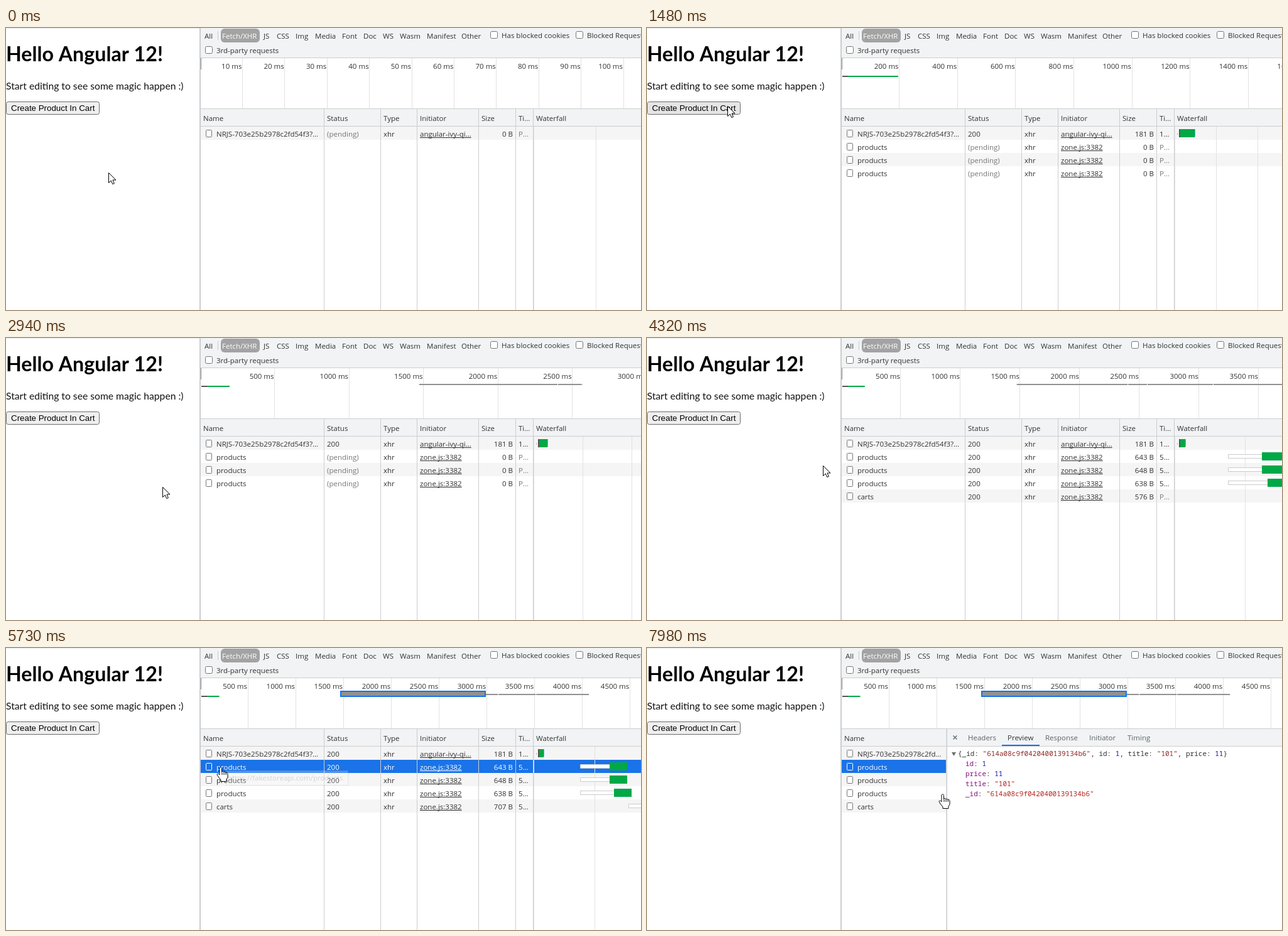
An HTML page with a canvas for the animation above (8 s loop, 1011 by 449 pixels).

```html
<!DOCTYPE html>
<html lang="en">
<head>
<meta charset="utf-8">
<title>Network panel demo</title>
<style>
html, body { margin: 0; width: 100%; height: 100%; overflow: hidden; background: #fff; }
canvas { display: block; }
</style>
</head>
<body>
<canvas id="stage" width="1011" height="449"></canvas>
<script>
const LOOP = 8000, W = 1011, H = 449;
const ctx = document.getElementById('stage').getContext('2d');

const UI = '11.5px "Open Sans", "Noto Sans", sans-serif';
const MONO = '11px "Noto Sans Mono", "DejaVu Sans Mono", monospace';
const INK = '#333', DIM = '#777', LINE = '#cacdd1', GRID = '#e2e2e2';
const BAR = '#f1f3f4', BLUE = '#1a73e8', GREEN = '#00a846';

// time, pointer x, pointer y
const POINTER = [
  [0, 163, 230], [130, 163, 230], [760, 128, 124], [1960, 128, 124],
  [2750, 222, 215], [2940, 249, 237], [3040, 249, 237], [3390, 260, 225],
  [3870, 260, 225], [4110, 280, 203], [4320, 280, 203], [5040, 345, 212],
  [5140, 345, 212], [5390, 342, 190], [6190, 342, 190], [6650, 606, 258],
  [6950, 569, 250], [7050, 569, 250], [7250, 513, 236], [7550, 709, 188],
  [7850, 664, 209], [7980, 471, 233], [8000, 471, 233]
];

// time, overview span in ms, waterfall ms per pixel, end of the grey overview bar
const SCALE = [
  [0, 104, .5025, 0], [130, 104, .5025, 0], [400, 240, 1.1, 0], [1310, 240, 1.1, 0],
  [1420, 1514, 7.52, 0], [1960, 1514, 7.52, 1467], [2750, 2957, 12.82, 2565],
  [3040, 2957, 12.82, 2565], [3390, 3690, 15, 2879], [3659, 3690, 15, 2879],
  [3660, 3690, 17.7, 4065], [4340, 3690, 17.7, 4065], [4400, 4610, 20.5, 4065],
  [8000, 4610, 20.5, 4065]
];

const ARROW = new Path2D('M.5 .5V16.5L4.3 13 6.8 18.6 9.4 17.5 7 12H12Z');
const HAND = new Path2D('M-2 12V1.5C-2-.6 1.5-.6 1.5 1.5V7.5C2 6 4 6 4.5 7.5' +
  'C5 6.6 7.5 7 7.7 8.5C8.5 7.8 11 8.3 11 10.5V16L9 19V22.5H0V20L-4 15-6 11.5C-5.7 9.5-4 9.5-2 12Z');

function sample(table, t, ease = x => x) {
  const i = Math.max(1, table.findIndex(row => row[0] > t));
  const a = table[i - 1], b = table[i];
  const u = ease((t - a[0]) / (b[0] - a[0]));
  return a.slice(1).map((v, j) => v + (b[j + 1] - v) * u);
}

const smooth = x => x * x * (3 - 2 * x);

// smallest 1-2-5 step that is at least 64 pixels wide
function gridStep(pxPerMs) {
  for (let p = 1; ; p *= 10)
    for (const m of [1, 2, 5]) if (m * p * pxPerMs >= 64) return m * p;
}

function rect(x, y, w, h, color) {
  ctx.fillStyle = color;
  ctx.fillRect(x, y, w, h);
}

function box(x, y, w, h, r, fill, stroke) {
  ctx.beginPath();
  ctx.roundRect(x, y, w, h, r);
  ctx.fillStyle = fill;
  ctx.fill();
  if (!stroke) return;
  ctx.lineWidth = 1;
  ctx.strokeStyle = stroke;
  ctx.stroke();
}

function text(s, x, y, color = INK, font = UI, align = 'left') {
  ctx.font = font;
  ctx.textAlign = align;
  ctx.fillStyle = color;
  ctx.fillText(s, x, y);
}

const vline = (x, y, h, color = LINE) => rect(Math.floor(x), y, 1, h, color);

function drawPage(t, x, y) {
  rect(0, 0, W, H, '#fff');
  rect(0, 0, 309, 1, '#ececec');
  text('Hello Angular 12!', 0, 53, '#000', 'bold 32.2px Lato, sans-serif');
  text('Start editing to see some magic happen :)', 0, 98, '#111', '15.7px Lato, sans-serif');
  const hover = x < 149 && y > 117 && y < 138;
  const pressed = t > 1310 && t < 1400;
  box(.5, 117.5, 148, 20, 3, pressed ? '#f5f5f5' : hover ? '#e5e5e5' : '#efefef', '#6b6b6b');
  text('Create Product In Cart', 8, 132, '#000', '13.333px "Liberation Sans", Arial, sans-serif');
}

function drawFilters() {
  rect(309, 0, W - 309, 47, BAR);
  rect(309, 47, W - 309, 1, LINE);
  box(342, 1, 62, 22, 6, '#a3a3a3');
  text('Fetch/XHR', 344, 17, '#fff');
  vline(337, 5, 14);
  const kinds = { All: 316, JS: 410, CSS: 431, Img: 461, Media: 492, Font: 535, Doc: 569,
    WS: 600, Wasm: 627, Manifest: 670, Other: 725 };
  for (const k in kinds) text(k, kinds[k], 17);
  const checks = [['Has blocked cookies', 771, 6], ['Blocked Requests', 907, 6], ['3rd-party requests', 317, 30]];
  for (const [label, x, y] of checks) {
    box(x + .5, y - .5, 11, 11, 2, '#fff', '#767676');
    text(label, x + 18, y + 10);
  }
}

function drawOverview(t, span, end) {
  const s = 701 / span, step = gridStep(s);
  const at = ms => 310 + ms * s;
  for (let ms = step; at(ms) < W + 60; ms += step) {
    vline(at(ms) - 1, 48, 80, GRID);
    text(ms + ' ms', at(ms) - 2, 65, INK, UI, 'right');
  }
  rect(309, 48, 2, 18, '#8a8a8a');
  if (t >= 300) {
    rect(311, 76, 10, 2, '#555');
    rect(320, 76, at(194) - 320, 2, GREEN);
  }
  if (end > 1467) {
    const top = 73;
    rect(at(1467), top, at(end) - at(1467), 2, '#919191');
    const gaps = t < 4340 ? [2396, 2558, 3111] : [3112, 3507];
    for (const ms of gaps) if (ms < end) rect(at(ms), top, 1, 2, '#fff');
  }
  if (t >= 5630) {
    rect(532, 68, 232, 10, BLUE);
    rect(534, 70, 228, 6, '#919191');
  }
  rect(309, 128, W - 309, 1, LINE);
}

function requests(t) {
  const done = t >= 3200, first = t >= 300;
  const list = [{
    name: 'NRJS-703e25b2978c2fd54f3?…', from: 'angular-ivy-qi…',
    ok: first, size: first ? '181 B' : '0 B', time: first ? '1…' : 'P…'
  }];
  if (t >= 1400)
    for (const size of [643, 648, 638])
      list.push({ name: 'products', from: 'zone.js:3382', ok: done,
        size: done ? size + ' B' : '0 B', time: done ? '5…' : 'P…' });
  if (t >= 3300)
    list.push({ name: 'carts', from: 'zone.js:3382', ok: t >= 4320,
      size: t < 4320 ? '0 B' : t < 4340 ? '576 B' : '707 B', time: t < 4340 ? 'P…' : '5…' });
  return list;
}

function drawWaterfall(t, i, y, msPerPx) {
  const at = ms => Math.floor(843 + ms / msPerPx);
  if (i === 0 && t >= 300) {
    const end = Math.floor(847 + 194 / msPerPx);
    rect(844, y + 10, 1, 3, '#bbb');
    rect(847, y + 4, end - 847, 13, GREEN);
    rect(847, y + 4, 2, 13, '#555');
    rect(end, y + 4, 1, 12, '#4db6e8');
  }
  if (i === 0 || t < 3390) return;
  const [start, wait, stop] = i === 4 ? [3053, 4000, 4065] : i === 3 ? [1467, 2580, 3155] : [1467, 2420, 3012];
  if (at(start) >= W) return;
  box(at(start) + .5, y + 7.5, at(wait) - at(start), 6, 0, '#fff', '#ccc');
  rect(at(wait), y + 4, at(stop) - at(wait), 13, GREEN);
}

function drawTable(t, pointer, msPerPx, detail) {
  const right = detail ? 477 : W;
  rect(310, 129, W - 310, 27, BAR);
  rect(310, 156, W - 310, 1, LINE);
  const list = requests(t);
  const over = pointer[0] > 310 && t < 5630 ? Math.floor((pointer[1] - 157) / 21) : -1;
  const rowY = i => 157 + i * 21;
  const picked = i => i === 1 && t >= 5630;

  list.forEach((r, i) => {
    const fill = picked(i) ? BLUE : i === over ? '#ebf2fc' : i % 2 ? '#fff' : '#f5f5f5';
    rect(310, rowY(i), right - 310, 21, fill);
  });

  if (!detail) {
    const heads = { Status: 511, Type: 601, Initiator: 659, Size: 757, 'Ti…': 816, Waterfall: 844 };
    for (const h in heads) text(h, heads[h], 148);
    const step = gridStep(1 / msPerPx) / msPerPx;
    for (let x = 840 + step; x < W; x += step) vline(x, 157, H - 157, GRID);
    for (const x of [506, 596, 654, 752, 811, 839]) vline(x, 129, H - 129);
    vline(840, 157, H - 157, GRID);
  }
  text('Name', 314, 148);

  list.forEach((r, i) => {
    const y = rowY(i), base = y + 16, ink = picked(i) ? '#fff' : INK;
    const faint = r.ok ? ink : DIM;
    box(318.5, y + 5.5, 9, 11, 1, picked(i) ? BLUE : '#fff', picked(i) ? '#fff' : '#777');
    text(detail && i === 0 ? 'NRJS-703e25b2978c2fd…' : r.name, 335, base, ink);
    if (detail) return;
    text(r.ok ? '200' : '(pending)', 511, base, faint);
    text('xhr', 601, base, ink);
    text(r.from, 659, base, ink);
    rect(659, base + 1, ctx.measureText(r.from).width, 1, ink);
    text(r.size, 807, base, ink, UI, 'right');
    text(r.time, 816, base, r.time === 'P…' ? DIM : ink);
    drawWaterfall(t, i, y, msPerPx);
  });
}

function code(x, y, parts) {
  for (const [s, color] of parts) {
    text(s, x, y, color, MONO);
    x += ctx.measureText(s).width;
  }
}

function drawDetail() {
  const id = '"614a08c9f0420400139134b6"';
  const key = '#881280', str = '#b3261e', num = '#1a1aa6', ink = '#333';
  vline(477, 129, H - 129);
  vline(476, 129, H - 129, '#dcdfe2');
  ctx.beginPath();
  ctx.moveTo(487.5, 139.5); ctx.lineTo(493.5, 145.5);
  ctx.moveTo(493.5, 139.5); ctx.lineTo(487.5, 145.5);
  ctx.lineWidth = 1.2;
  ctx.strokeStyle = '#5f6368';
  ctx.stroke();
  const tabs = { Headers: 511, Preview: 574, Response: 634, Initiator: 704, Timing: 765 };
  for (const k in tabs) text(k, tabs[k], 147, k === 'Preview' ? INK : '#5f6368');
  rect(565, 154, 60, 2, BLUE);

  ctx.beginPath();
  ctx.moveTo(485, 166); ctx.lineTo(492, 166); ctx.lineTo(488.5, 172);
  ctx.fillStyle = '#6e6e6e';
  ctx.fill();
  code(495, 172, [['{_id: ', ink], [id, '#8e2a26'], [', id: ', ink], ['1', num],
    [', title: ', ink], ['"101"', '#8e2a26'], [', price: ', ink], ['11', num], ['}', ink]]);
  const props = [['id', '1', num], ['price', '11', num], ['title', '"101"', str], ['_id', id, str]];
  props.forEach(([k, v, color], i) => code(507, 188 + i * 16, [[k, key], [': ', ink], [v, color]]));
}

function drawTooltip() {
  ctx.globalAlpha = .22;
  box(350.5, 195.5, 194, 23, 0, '#fff', '#aaa');
  text('https://fakestoreapi.com/products', 353, 211, '#555');
  ctx.globalAlpha = 1;
}

function drawPointer([x, y], detail) {
  const overRow = x > 310 && x < (detail ? 477 : W) && y > 157 && y < 262;
  const shape = overRow ? HAND : ARROW;
  ctx.save();
  ctx.translate(x, y);
  ctx.lineWidth = 1;
  ctx.lineJoin = 'round';
  ctx.fillStyle = '#fff';
  ctx.fill(shape);
  ctx.strokeStyle = '#000';
  ctx.stroke(shape);
  if (overRow) {
    for (const dx of [1.5, 4.6, 7.7]) rect(dx, 8, 1, 4, '#000');
  }
  ctx.restore();
}

function draw(t) {
  const pointer = sample(POINTER, t, smooth);
  // the panel refreshes in short ticks while requests run
  const [span, msPerPx, end] = sample(SCALE, Math.floor(t / 20) * 20);
  const detail = t >= 5760;
  drawPage(t, ...pointer);
  drawFilters();
  drawOverview(t, span, end);
  drawTable(t, pointer, msPerPx, detail);
  rect(308, 0, 2, H, LINE);
  if (detail) drawDetail();
  else if (t >= 5700) drawTooltip();
  drawPointer(pointer, detail);
}

const began = performance.now();
function tick() {
  draw((performance.now() - began) % LOOP);
  requestAnimationFrame(tick);
}
tick();
</script>
</body>
</html>
```
